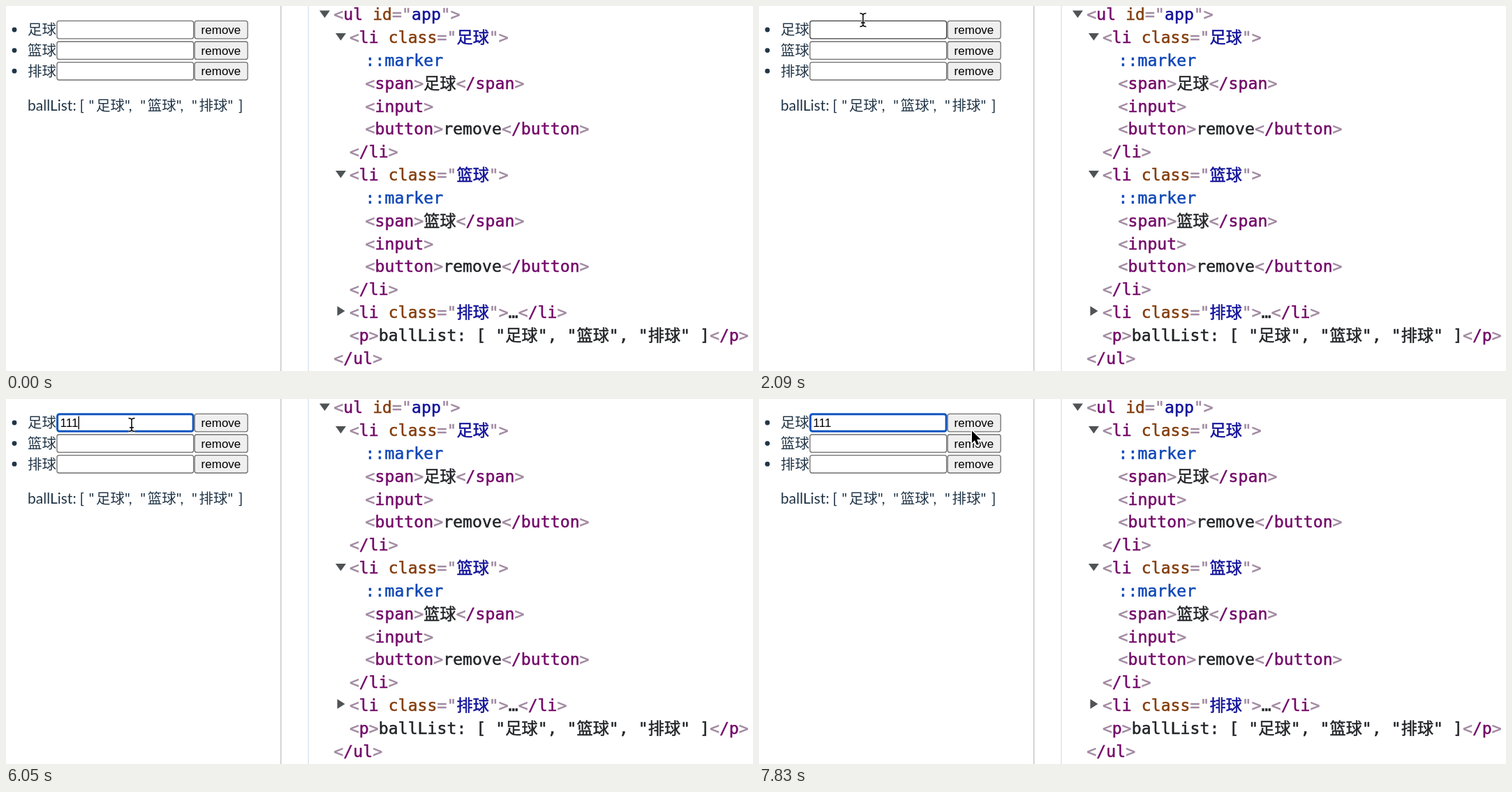
An HTML page with a canvas that plays this animation: 1070 px wide and 523 px high, repeating every 8 s.

```html
<!DOCTYPE html>
<html lang="zh-CN">
<meta charset="utf-8">
<style>
html, body { margin: 0; width: 100%; height: 100%; overflow: hidden; background: #fff; }
canvas { display: block; }
</style>
<canvas id="stage" width="1070" height="523"></canvas>
<script>
const ctx = document.getElementById('stage').getContext('2d');
const LOOP = 8000;
const CJK = '"Noto Sans CJK SC", "Noto Sans CJK", sans-serif';
const MONO = '23.2px "DejaVu Sans Mono", ' + CJK + ', monospace';
const PAGE = '21px Lato, ' + CJK;
const LIST = '20.5px ' + CJK;
const FORM = '17px "Liberation Sans", Arial, sans-serif';
const INK = '#213547';

const balls = ['足球', '篮球', '排球'];
const openItem = ball => [
  [1, `<li class="${ball}">`], [2, '::marker'], [2, `<span>${ball}</span>`],
  [2, '<input>'], [2, '<button>remove</button>'], [1, '</li>']
];
const tree = [
  [0, '<ul id="app">'],
  ...openItem(balls[0]),
  ...openItem(balls[1]),
  [1, `<li class="${balls[2]}">…</li>`],
  [1, `<p>ballList: [ "${balls.join('", "')}" ]</p>`],
  [0, '</ul>']
];

// Groups: punctuation, tag, attribute, value, pseudo-element, text
const TOKEN = /(<|="|">|>)|((?<=<)\/?\w+)|( \w+(?==))|((?<==")[^"]+)|(::\w+)|([^<]+)/g;
const TOKEN_COLORS = ['#a088a0', '#740a6a', '#843e0e', '#12129a', '#0f47b6', '#222428'];

function text(str, x, y, font, color, weight = 0) {
  ctx.font = font;
  ctx.fillStyle = ctx.strokeStyle = color;
  ctx.fillText(str, x, y);
  if (weight) {
    ctx.lineWidth = weight;
    ctx.lineJoin = 'round';
    ctx.strokeText(str, x, y);
  }
  return x + ctx.measureText(str).width;
}

function polygon(points, color) {
  ctx.beginPath();
  points.forEach(([x, y]) => ctx.lineTo(x, y));
  ctx.closePath();
  ctx.fillStyle = color;
  ctx.fill();
}

function box(x, y, w, h, fill, stroke, weight) {
  ctx.beginPath();
  ctx.roundRect(x, y, w, h, 3);
  ctx.fillStyle = fill;
  ctx.fill();
  ctx.strokeStyle = stroke;
  ctx.lineWidth = weight;
  ctx.stroke();
}

function drawTree() {
  ctx.fillStyle = '#c6c8ca';
  ctx.fillRect(393, 0, 1.5, 523);
  ctx.fillStyle = '#cfe0ec';
  ctx.fillRect(432.5, 0, 1.2, 523);
  tree.forEach(([depth, line], i) => {
    let x = 469.3 + depth * 22.6;
    for (const m of line.matchAll(TOKEN)) {
      const kind = m.slice(1).findIndex(g => g !== undefined);
      x = text(m[0], x, 20.3 + i * 32.83, MONO, TOKEN_COLORS[kind], .5);
    }
  });
  for (const [x, y] of [[449, 6.5], [472, 39], [472, 236]])
    polygon([[x, y], [x + 15, y], [x + 7.5, y + 10.5]], '#505355');
  polygon([[474.5, 430], [485.5, 437], [474.5, 444]], '#505355');
}

function drawSummary() {
  const y = 149.5;
  text('ballList:', 31, y, PAGE, INK);
  text('[', 105.5, y, PAGE, INK);
  balls.forEach((ball, i) => {
    const x = 129 + i * 73.8;
    text('"', x - 10.5, y, PAGE, INK);
    text(ball, x, y + .5, LIST, INK);
    text(i < 2 ? '",' : '"', x + 41, y, PAGE, INK);
  });
  text(']', 333, y, PAGE, INK);
}

function drawForm(t) {
  const focused = t >= 2600;
  const hoverInput = t < 850 ? -1 : t < 1200 ? 1 : t < 2600 ? 0 : -1;
  const hoverButton = t >= 6700 && t < 7250 ? 1 : -1;
  balls.forEach((ball, i) => {
    const y = 34 + i * 29.6;
    ctx.beginPath();
    ctx.arc(12, y, 3.4, 0, 7);
    ctx.fillStyle = INK;
    ctx.fill();
    text(ball, 31, y + 7.4, LIST, INK);

    if (focused && i === 0) box(73.6, y - 12.2, 194.6, 24.4, '#fff', '#0f55c0', 3);
    else box(73, y - 12.6, 195.7, 25.4, '#fff', i === hoverInput ? '#3c3c3c' : '#6e6e6e', 1.3);

    const over = i === hoverButton;
    box(270.2, y - 12.6, 76, 25.4, over ? '#dfdfdf' : '#efefef', over ? '#4a4a4a' : '#707070', 1.3);
    text('remove', 279.6, y + 6, FORM, '#000');
  });

  if (!focused) return;
  const typed = [4210, 4500, 4750].filter(k => t >= k);
  const end = text('1'.repeat(typed.length), 77.6, 40, FORM, '#000');
  const since = Math.min(t, 7400) - (typed.at(-1) ?? 2600);
  if (since % 1000 < 500) {
    ctx.fillStyle = '#000';
    ctx.fillRect(end, 24.5, 1.4, 19);
  }
}

// Pointer stops: time, x, y
const approach = [[350, 215, 260], [850, 164, 72], [1150, 155, 37], [1600, 154, 30],
  [2090, 149, 20], [2400, 151, 35], [4200, 152, 36]];
const leave = [[5100, 152, 37], [5900, 180, 37], [6200, 180, 37], [6600, 270, 58],
  [6850, 300, 55], [7130, 303, 50.5], [7400, 305, 45.5], [8001, 305, 45.5]];

function pointerAt(t) {
  for (const path of [approach, leave]) {
    const i = path.findIndex(stop => stop[0] > t);
    if (i < 1) continue;
    const [t0, x0, y0] = path[i - 1], [t1, x1, y1] = path[i];
    const u = (t - t0) / (t1 - t0), k = u * u * (3 - 2 * u);
    return [x0 + (x1 - x0) * k, y0 + (y1 - y0) * k];
  }
}

const ARROW = new Path2D('M0 0V17.6L4 13.8 6.9 20.6 10 19.3 7.1 12.6H12.7Z');
const IBEAM = new Path2D('M-4.5-9.5Q0-9.5 0-6.5Q0-9.5 4.5-9.5M0-7V7M-4.5 9.5Q0 9.5 0 6.5Q0 9.5 4.5 9.5M-3 4H3');

function drawPointer(t) {
  const at = pointerAt(t);
  if (!at) return;
  const [x, y] = at;
  ctx.save();
  ctx.translate(x, y);
  ctx.strokeStyle = '#fff';
  ctx.lineWidth = 3;
  if (x < 269 && y < 108) {
    ctx.stroke(IBEAM);
    ctx.strokeStyle = '#000';
    ctx.lineWidth = 1.5;
    ctx.stroke(IBEAM);
  } else {
    ctx.stroke(ARROW);
    ctx.fillStyle = '#000';
    ctx.fill(ARROW);
  }
  ctx.restore();
}

const start = performance.now();
function frame() {
  const t = (performance.now() - start) % LOOP;
  ctx.fillStyle = '#fff';
  ctx.fillRect(0, 0, 1070, 523);
  drawTree();
  drawSummary();
  drawForm(t);
  drawPointer(t);
  requestAnimationFrame(frame);
}
frame();
</script>
</html>
```
